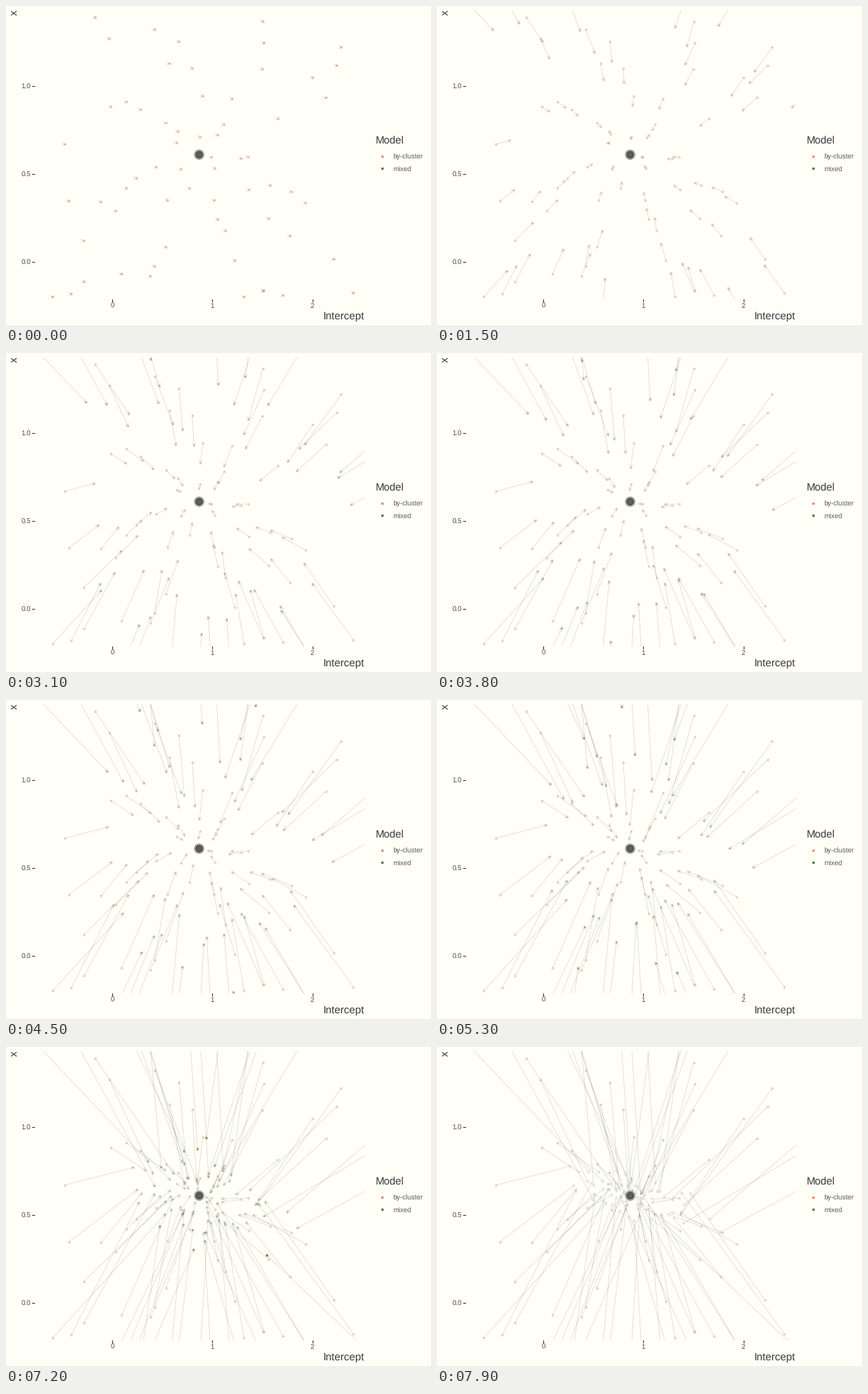
A matplotlib script for the animation above (10 s loop, 600 by 450 pixels).

```python
import numpy as np
import matplotlib.pyplot as plt
from matplotlib.animation import FuncAnimation
from matplotlib.collections import LineCollection
from matplotlib.colors import to_rgb
from matplotlib.patches import Circle, Rectangle

W, H, DPI = 600, 450, 100
STEPS, FRAMES, INTERVAL = 79, 100, 100
PX = 72 / DPI
IVORY, ORANGE, OLIVE = "#fffff8", "#ec8a5e", "#5b7230"
CENTER = np.array([272.7, 209.7])
CLUSTERS = 87
rng = np.random.default_rng(12)


def scatter_clusters():
    """Jittered sunflower whose long tail stretches along the slope axis."""
    k = np.arange(CLUSTERS)
    radius = 22 + 4.1 * k + 1.2 * np.exp((k - 52) / 6) + rng.uniform(-8, 8, CLUSTERS)
    theta = k * np.pi * (3 - np.sqrt(5)) + rng.uniform(-0.35, 0.35, CLUSTERS)
    lift = 1 / (1 + (radius / 250) ** 2)
    dx = np.cos(theta) * radius / np.hypot(1, radius / 260)
    dy = np.sign(np.sin(theta)) * radius * np.abs(np.sin(theta)) ** lift
    return CENTER + np.column_stack([dx, dy])


def shrink(points):
    """Pull estimates to the center, harder where the slope is extreme."""
    dx, dy = (points - CENTER).T
    keep = 1 / (1 + (dy / 230) ** 2)
    ex = 0.46 * dx * keep
    ey = 0.15 * dx * keep + 0.2 * dy / (1 + (dy / 150) ** 2)
    spread = np.minimum(np.hypot(dx, dy) / 18, 18)[:, None]
    return CENTER + np.column_stack([ex, ey]) + spread * rng.normal(size=points.shape)


# The outermost clusters frame the cloud; the rest follow the rule.
outer = [(47, 0), (467, 84), (529, 119), (549, 128), (545, 183), (1009, 901),
         (463, 357), (364, 401), (363, 402), (83, 195)]
start = np.vstack([scatter_clusters(), outer])
end = shrink(start)
travel = end - start
distance = np.hypot(*travel.T)
heading = np.arctan2(travel[:, 1], travel[:, 0])

plt.rcParams["font.family"] = "Liberation Sans"
plt.rcParams["text.hinting"] = "none"
fig = plt.figure(figsize=(W / DPI, H / DPI), dpi=DPI, facecolor=IVORY)
ax = fig.add_axes([0, 0, 1, 1])
ax.set(xlim=(0, W), ylim=(H, 0))
ax.axis("off")
panel = Rectangle((41, 5.5), 465.5, 408.5, fc="none", ec="none")
ax.add_patch(panel)


def label(x, y, text, size, color="#4d4d4d", **kw):
    ax.text(x, y, text, fontsize=size * PX, color=color,
            **{"va": "baseline", **kw})


def dots(points, color, alpha=None, **kw):
    return ax.scatter(*np.transpose(points), s=(3.6 * PX) ** 2, c=color,
                      alpha=alpha, linewidths=0, **kw)


for value, y in ((1.0, 113.4), (0.5, 237.3), (0.0, 361.2)):
    ax.plot([37, 40], [y, y], color="#333333", lw=1.1 * PX)
    label(35, y + 3.5, f"{value:.1f}", 9.8, ha="right")
for value, x in enumerate((150, 291.3, 432.6)):
    ax.plot([x, x], [414, 416.6], color="#333333", lw=1.1 * PX)
    label(x, 426, str(value), 9.8, ha="center")

label(506.3, 442, "Intercept", 15, "#3a3a3a", ha="right")
label(12, 9, "x", 15, "#3a3a3a", rotation=90, ha="center", va="center")
label(522, 195, "Model", 14.8, "#3a3a3a")
for y, name, color in ((211.5, "by-cluster", ORANGE), (229, "mixed", OLIVE)):
    dots([(531.3, y)], color)
    label(546.7, y + 3.5, name, 9.8, "#5a5a5a")

dots(start, ORANGE, 0.4, zorder=2).set_clip_path(panel)
arrows = LineCollection([], colors="#555555", alpha=0.2, linewidths=0.85 * PX,
                        zorder=3)
ax.add_collection(arrows)
arrows.set_clip_path(panel)
moving = dots(start, ORANGE, zorder=4)
moving.set_clip_path(panel)

ax.add_patch(Circle(CENTER, 6.7, fc="#b4b4ae", ec="#8c8c87", lw=0.9 * PX, zorder=5))
ax.add_patch(Circle(CENTER, 4.6, fc="#5e5e5a", ec="#3c3c3a", lw=1.1 * PX, zorder=6))


def update(frame):
    p = min(frame, STEPS) / STEPS
    tip = start + p * travel
    angle = heading if p > 0 else np.zeros(len(start))

    def barb(turn):
        a = angle + np.pi + turn
        return tip + 4.8 * np.column_stack([np.cos(a), np.sin(a)])

    shafts = np.stack([start, tip], axis=1)
    heads = np.stack([barb(np.pi / 6), tip, barb(-np.pi / 6)], axis=1)
    arrows.set_segments([*shafts, *heads])

    mix = min(1, 3 * p)
    rgba = np.empty((len(start), 4))
    rgba[:, :3] = (1 - mix) * np.array(to_rgb(ORANGE)) + mix * np.array(to_rgb(OLIVE))
    rgba[:, 3] = np.clip(0.18 + distance / 1500, 0, 0.85) if p < 1 else 0
    moving.set_offsets(tip)
    moving.set_facecolors(rgba)
    return arrows, moving


animation = FuncAnimation(fig, update, frames=FRAMES, interval=INTERVAL,
                          repeat=True, repeat_delay=0, blit=False)
plt.show()
```
